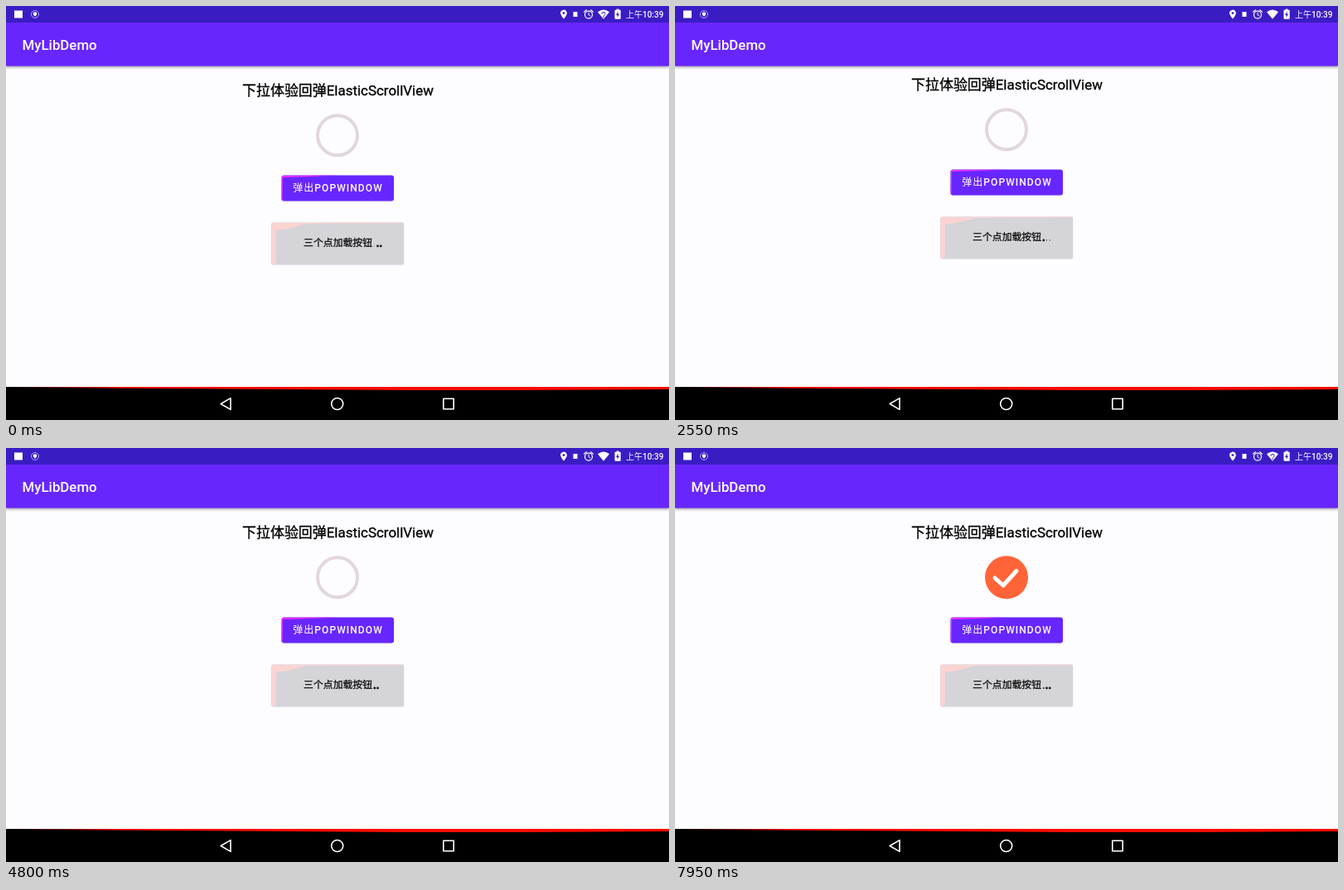
Recreate the animation shown at these times as an HTML page with a canvas. Size 800x500 px, loop 8 s.

```html
<!DOCTYPE html>
<html lang="zh-CN">
<head>
<meta charset="utf-8">
<title>MyLibDemo</title>
<style>
html, body { margin: 0; width: 100%; height: 100%; overflow: hidden; background: #fdfcff; }
canvas { display: block; width: 800px; height: 500px; }
</style>
</head>
<body>
<canvas id="stage" width="800" height="500"></canvas>
<script>
const ctx = document.getElementById('stage').getContext('2d');
const LOOP = 8000, STEP = 50, TAU = Math.PI * 2;
const FONT = 'Roboto, "Noto Sans CJK SC", "Noto Sans CJK", sans-serif';
const PURPLE = '#6826ff', STATUS = '#3b1cc4', PAGE = '#fdfcff', ORANGE = '#ff6438', GREY = '#e1d7dc';

const clamp = v => Math.min(1, Math.max(0, v));
const part = (t, from, to) => clamp((t - from) / (to - from));
const smooth = p => p * p * (3 - 2 * p);

// heft thickens the glyphs with a thin outline
function text(str, x, y, size, color, { weight = 400, spacing = 0, heft = 0 } = {}) {
  ctx.font = `${weight} ${size}px ${FONT}`;
  ctx.letterSpacing = spacing + 'px';
  ctx.fillStyle = ctx.strokeStyle = color;
  ctx.fillText(str, x, y);
  if (heft) {
    ctx.lineWidth = heft;
    ctx.strokeText(str, x, y);
  }
}

function rect(x, y, w, h, color) {
  ctx.fillStyle = color;
  ctx.fillRect(x, y, w, h);
}

function roundRect(x, y, w, h, r, color) {
  ctx.beginPath();
  ctx.roundRect(x, y, w, h, r);
  ctx.fillStyle = color;
  ctx.fill();
}

function disc(x, y, r, color) {
  ctx.beginPath();
  ctx.arc(x, y, r, 0, TAU);
  ctx.fillStyle = color;
  ctx.fill();
}

function arc(x, y, r, width, color, from = 0, sweep = TAU) {
  ctx.beginPath();
  ctx.arc(x, y, r, from, from + sweep);
  ctx.lineWidth = width;
  ctx.strokeStyle = color;
  ctx.stroke();
}

function path(points, closed) {
  ctx.beginPath();
  points.forEach(([x, y]) => ctx.lineTo(x, y));
  if (closed) ctx.closePath();
}

function line(points, width, color, closed) {
  path(points, closed);
  ctx.lineWidth = width;
  ctx.strokeStyle = color;
  ctx.stroke();
}

function fill(points, color) {
  path(points, true);
  ctx.fillStyle = color;
  ctx.fill();
}

function shadowOn(color, blur, y) {
  ctx.shadowColor = color;
  ctx.shadowBlur = blur;
  ctx.shadowOffsetY = y;
}

// Drag up, hold, then spring back to the top.
function scrollAt(t) {
  const y = t < 3900
    ? smooth(part(t, 2358, 3650))
    : Math.pow(1 - part(t, 3900, 4400), 3);
  return Math.round(-117 * y);
}

function tickView(t) {
  const x = 400, y = 156.3;
  const ring = part(t, 7620, 7740);
  const shrink = part(t, 7740, 7850);
  const mark = part(t, 7850, 7950);
  if (shrink <= 0) {
    arc(x, y, 24, 4, GREY);
    if (ring > 0) arc(x, y, 24, 4, ORANGE, Math.PI / 2, TAU * ring);
    return;
  }
  disc(x, y, 26 + 3 * Math.sin(Math.PI * mark), ORANGE);
  if (shrink < 1) disc(x, y, 22 * (1 - shrink), PAGE);
  if (mark > 0) {
    ctx.globalAlpha = mark;
    line([[386, 157], [396, 166], [412, 148.5]], 5, '#fff');
    ctx.globalAlpha = 1;
  }
}

function loadingDots(t) {
  [0.63, 0.9, 0.2].forEach((peak, i) => {
    const size = clamp(1.2 + 1.35 * Math.cos(TAU * (t / 1000 - peak)));
    disc(444.8 + i * 3.7, 289.9, 1.4 * size, '#111');
  });
}

function buttons(t) {
  shadowOn('rgba(80,50,120,.25)', 1.5, 0.5);
  roundRect(332.5, 204.5, 135.5, 31, 3, PURPLE);
  roundRect(320.5, 261.5, 159.5, 50.5, 2, '#d5d4d8');
  shadowOn('transparent', 0, 0);

  // Tinted upper left edges
  fill([[333, 205], [402, 204.5], [366, 206], [334, 207], [333.6, 234], [332.5, 234]], '#f22cff');
  fill([[320.5, 262], [480, 261.5], [480, 262.3], [362, 263], [340, 269], [326, 271],
    [325.5, 311.5], [320.5, 311.5]], '#fbd3d3');

  text('弹出POPWINDOW', 346.2, 224.3, 12, '#fff', { weight: 500, spacing: 1.07 });
  text('三个点加载按钮', 359.1, 290.3, 11.85, '#111', { weight: 500, heft: 0.3 });
  loadingDots(t);
}

function content(t) {
  ctx.save();
  ctx.beginPath();
  ctx.rect(0, 73, 800, 387);
  ctx.clip();
  ctx.translate(0, scrollAt(t));
  ctx.textAlign = 'center';
  text('下拉体验回弹ElasticScrollView', 400.5, 107.8, 16.95, '#000', { heft: 0.3 });
  ctx.textAlign = 'left';
  tickView(t);
  buttons(t);
  ctx.restore();
}

function statusBar(t) {
  const white = '#fff';
  rect(0, 0, 800, 20, STATUS);
  rect(10, 5.5, 10, 9, white);

  arc(35, 10, 4.5, 0.8, '#c9bff5');
  fill([[32.8, 8], [35, 7.2], [37.2, 8], [37, 10.6], [35, 12.8], [33, 10.6]], white);

  // Location pin
  ctx.beginPath();
  ctx.arc(673, 8.6, 3.9, Math.PI * 0.9, Math.PI * 2.1);
  ctx.quadraticCurveTo(675.8, 12.5, 673, 15.6);
  ctx.quadraticCurveTo(670.2, 12.5, 669.3, 9.8);
  ctx.fillStyle = white;
  ctx.fill();
  disc(673, 8.6, 1.4, STATUS);

  rect(684.5, 7, 5, 6, white);

  // Alarm clock
  arc(703, 10.6, 4.5, 1.2, white);
  line([[703, 8], [703, 10.8], [705, 12]], 1, white);
  line([[697.5, 7.2], [700.4, 4.8]], 1.2, white);
  line([[708.5, 7.2], [705.6, 4.8]], 1.2, white);

  // Signal fan
  ctx.beginPath();
  ctx.moveTo(714, 7.2);
  ctx.quadraticCurveTo(721, 2, 728, 7.2);
  ctx.lineTo(721, 15.8);
  ctx.fillStyle = white;
  ctx.fill();
  if (t < 800 || t >= 7000) {
    arc(721, 9.4, 2.1, 1, STATUS, Math.PI, Math.PI * 1.4);
    rect(720.4, 12.5, 1.3, 1.5, STATUS);
  }

  // Charging battery
  rect(736.6, 3.6, 3, 2, white);
  roundRect(734.5, 4.8, 7.2, 11, 0.8, white);
  fill([[738.6, 6.6], [736, 10.9], [737.7, 10.9], [737.5, 14], [740.1, 9.7], [738.5, 9.7]], STATUS);

  text('上午10:39', 748, 13.7, 10, white, { weight: 500 });
}

function appBar() {
  shadowOn('rgba(40,30,60,.45)', 3, 1);
  rect(0, 20, 800, 52.5, PURPLE);
  shadowOn('transparent', 0, 0);
  text('MyLibDemo', 19.5, 53, 16.85, '#fff', { weight: 500 });
}

function navBar() {
  rect(0, 460, 800, 40, '#000');
  const glow = ctx.createLinearGradient(0, 0, 140, 0);
  glow.addColorStop(0, '#000');
  glow.addColorStop(1, '#fa0c00');
  fill([[0, 460], [800, 460], [800, 463], [620, 464], [480, 464], [200, 462], [0, 460.8]], glow);
  line([[259.2, 480.5], [271, 473.6], [271, 487.4]], 1.6, '#fff', true);
  arc(399.7, 480.5, 7, 1.6, '#fff');
  ctx.lineWidth = 1.6;
  ctx.strokeRect(527.8, 474.3, 12.4, 12.4);
}

function draw(now) {
  const t = Math.floor((now % LOOP) / STEP) * STEP;
  ctx.lineCap = ctx.lineJoin = 'round';
  rect(0, 0, 800, 500, PAGE);
  content(t);
  appBar();
  statusBar(t);
  navBar();
}

const start = performance.now();
function tick() {
  draw(performance.now() - start);
  requestAnimationFrame(tick);
}
tick();
</script>
</body>
</html>
```
